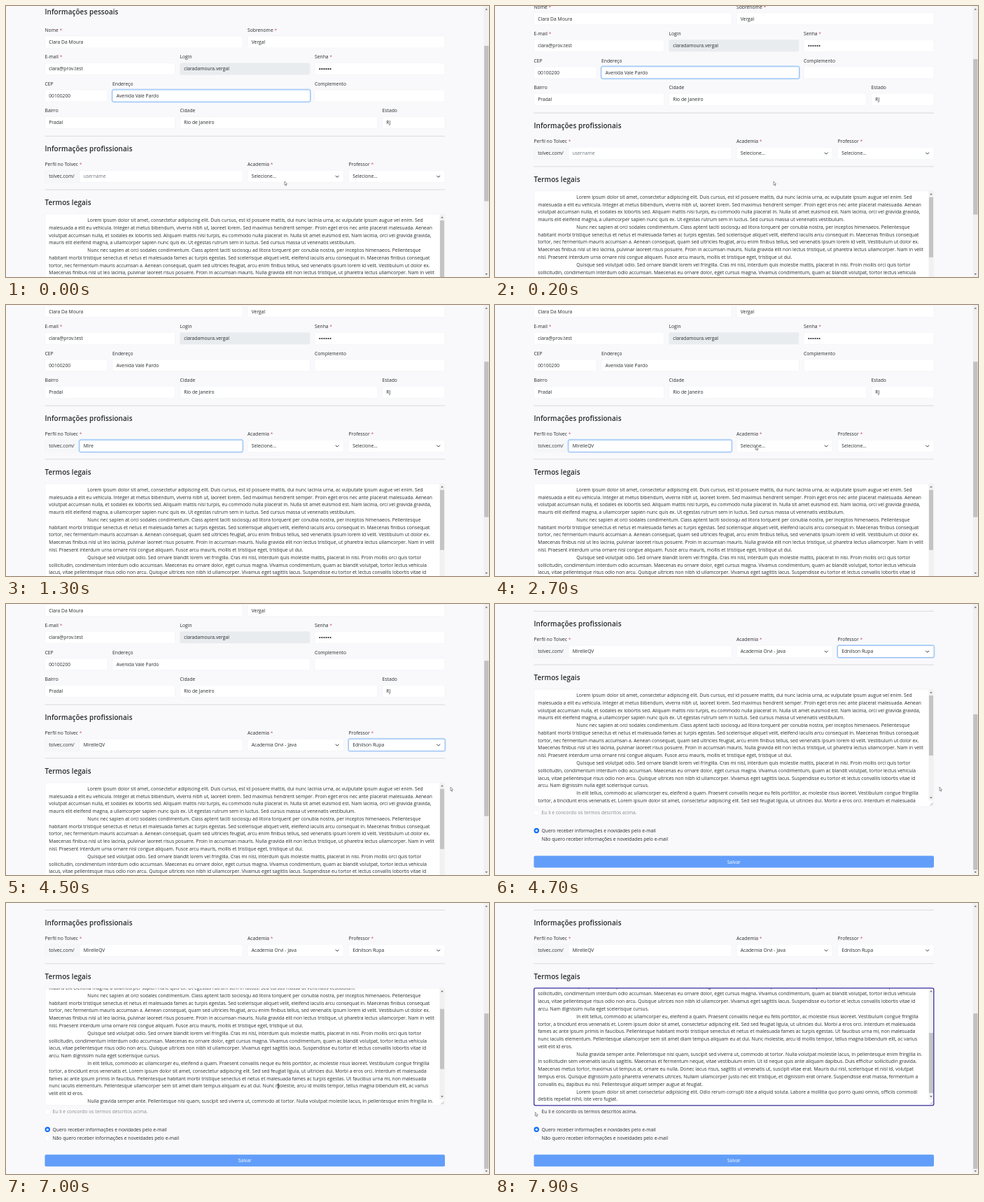
Write an HTML page with a canvas that moves like this. It is 690 px wide and 388 px high and loops after 8 s.

```html
<!DOCTYPE html>
<html lang="pt-BR">
<head>
<meta charset="utf-8">
<title>Cadastro</title>
<style>
html, body { margin: 0; width: 100%; height: 100%; overflow: hidden; background: #f9f9fc; }
canvas { display: block; }
</style>
</head>
<body>
<canvas id="stage" width="690" height="388"></canvas>
<script>
const ctx = document.getElementById('stage').getContext('2d');
const LOOP = 8000, STEP = 100;
const INK = '#262a2d', MUTED = '#6c757d', SIZE = 6.765, LINE = 10.785;

const TERMS = `\tLorem ipsum dolor sit amet, consectetur adipiscing elit. Duis cursus, est id posuere mattis, dui nunc lacinia urna, ac vulputate ipsum augue vel enim. Sed
malesuada a elit eu vehicula. Integer at metus bibendum, viverra nibh ut, laoreet lorem. Sed maximus hendrerit semper. Proin eget eros nec ante placerat malesuada. Aenean
volutpat accumsan nulla, et sodales ex lobortis sed. Aliquam mattis nisi turpis, eu commodo nulla placerat in. Nulla sit amet euismod est. Nam lacinia, orci vel gravida gravida,
mauris elit eleifend magna, a ullamcorper sapien nunc quis ex. Ut egestas rutrum sem in luctus. Sed cursus massa ut venenatis vestibulum.
\tNunc nec sapien at orci sodales condimentum. Class aptent taciti sociosqu ad litora torquent per conubia nostra, per inceptos himenaeos. Pellentesque
habitant morbi tristique senectus et netus et malesuada fames ac turpis egestas. Sed scelerisque aliquet velit, eleifend iaculis arcu consequat in. Maecenas finibus consequat
tortor, nec fermentum mauris accumsan a. Aenean consequat, quam sed ultricies feugiat, arcu enim finibus tellus, sed venenatis ipsum lorem id velit. Vestibulum ut dolor ex.
Maecenas finibus nisl ut leo lacinia, pulvinar laoreet risus posuere. Proin in accumsan mauris. Nulla gravida elit non lectus tristique, ut pharetra lectus ullamcorper. Nam in velit
nisl. Praesent interdum urna ornare nisi congue aliquam. Fusce arcu mauris, mollis et tristique eget, tristique ut dui.
\tQuisque sed volutpat odio. Sed ornare blandit lorem vel fringilla. Cras mi nisl, interdum quis molestie mattis, placerat in nisi. Proin mollis orci quis tortor
sollicitudin, condimentum interdum odio accumsan. Maecenas eu ornare dolor, eget cursus magna. Vivamus condimentum, quam ac blandit volutpat, tortor lectus vehicula
lacus, vitae pellentesque risus odio non arcu. Quisque ultrices non nibh id ullamcorper. Vivamus eget sagittis lacus. Suspendisse eu tortor et lectus convallis lobortis vitae id
arcu. Nam dignissim nulla eget scelerisque cursus.
\tIn elit tellus, commodo ac ullamcorper eu, eleifend a quam. Praesent convallis neque eu felis porttitor, ac molestie risus laoreet. Vestibulum congue fringilla
tortor, a tincidunt eros venenatis et. Lorem ipsum dolor sit amet, consectetur adipiscing elit. Sed sed feugiat ligula, ut ultricies dui. Morbi a eros orci. Interdum et malesuada
fames ac ante ipsum primis in faucibus. Pellentesque habitant morbi tristique senectus et netus et malesuada fames ac turpis egestas. Ut faucibus urna mi, non malesuada
nunc iaculis elementum. Pellentesque ullamcorper sem sit amet diam tempus aliquam eu at dui. Nunc molestie, arcu id mollis tempor, tellus magna bibendum elit, ac varius
velit elit id eros.
\tNulla gravida semper ante. Pellentesque nisi quam, suscipit sed viverra ut, commodo at tortor. Nulla volutpat molestie lacus, in pellentesque enim fringilla in.
In sollicitudin sem venenatis iaculis sagittis. Maecenas et fermentum neque, vitae vestibulum enim. Ut id neque quis ante aliquam dapibus. Duis efficitur sollicitudin gravida.
Maecenas metus tortor, maximus ut tempus at, ornare eu nulla. Donec lacus risus, sagittis ut venenatis ut, suscipit vitae erat. Mauris dui nisl, scelerisque et nisl id, volutpat
tempus eros. Quisque dignissim justo pharetra venenatis ultrices. Nullam ullamcorper justo nec elit tristique, et dignissim erat ornare. Suspendisse erat massa, fermentum a
convallis eu, dapibus eu nisl. Pellentesque aliquet semper augue at feugiat.
\tLorem ipsum dolor sit amet consectetur adipisicing elit. Odio rerum corrupti iste a aliquid soluta. Labore a mollitia quo porro quasi omnis, officiis commodi
debitis repellat nihil, iste vero fugiat.`.split('\n');

// Keyframes: [time, ...values]
const PAGE_SCROLL = [[0, 0], [100, 20.6], [200, 33.2], [300, 39.6], [400, 41.8], [500, 42.2],
  [4500, 42.2], [4600, 125], [4700, 176], [5000, 176.2]];
const TERMS_SCROLL = [[6800, 0], [6900, 14], [7000, 41], [7100, 52], [7200, 80], [7300, 100], [7400, 108.2]];
const POINTER = [[0, 398, 251], [500, 398, 251], [800, 250, 200], [2600, 372.5, 202], [2900, 372.5, 202],
  [3100, 384, 231], [3400, 384, 231], [3700, 512, 201], [3900, 512, 201], [4200, 530, 245], [4400, 530, 245],
  [4500, 635, 262], [5300, 635, 262], [5800, 100, 325], [6000, 100, 325], [6100, 79, 311], [6200, 79, 311],
  [6400, 59, 297], [6500, 59, 297], [6600, 266, 236], [6800, 266, 236], [6900, 389, 262], [7500, 389, 262],
  [7700, 165, 288], [7900, 57.5, 299.5]];
const FOCUS = [[0, 'address'], [800, 'user'], [2900, 'academy'], [3600, 'teacher'], [5700, ''], [7500, 'terms']];

function track(keys, t) {
  const next = keys.findIndex(k => k[0] > t);
  if (next === 0) return keys[0].slice(1);
  if (next < 0) return keys[keys.length - 1].slice(1);
  const a = keys[next - 1], b = keys[next], u = (t - a[0]) / (b[0] - a[0]);
  return a.slice(1).map((v, i) => v + (b[i + 1] - v) * u);
}

// Drawn at ten times the size and scaled down, for fractional glyph advances.
function text(str, x, cy, { color = INK, size = SIZE, weight = 400, align = 'left' } = {}) {
  ctx.save();
  ctx.translate(x, cy + size * 0.36);
  ctx.scale(0.1, 0.1);
  ctx.font = `${weight} ${size * 10}px "Open Sans", "Noto Sans", sans-serif`;
  ctx.textAlign = align;
  ctx.fillStyle = color;
  ctx.fillText(str, 0, 0);
  const width = ctx.measureText(str).width / 10;
  ctx.restore();
  return width;
}

function box(x, y, w, h, fill, stroke, line = 0.5, radius = 2) {
  ctx.beginPath();
  ctx.roundRect(x, y, w, h, radius);
  if (fill) { ctx.fillStyle = fill; ctx.fill(); }
  if (stroke) { ctx.strokeStyle = stroke; ctx.lineWidth = line; ctx.stroke(); }
}

function poly(points, fill, stroke, line = 0.7) {
  ctx.beginPath();
  points.forEach(([x, y]) => ctx.lineTo(x, y));
  if (fill) { ctx.closePath(); ctx.fillStyle = fill; ctx.fill(); }
  if (stroke) { ctx.strokeStyle = stroke; ctx.lineWidth = line; ctx.stroke(); }
}

function disc(x, y, r, fill, stroke) {
  ctx.beginPath();
  ctx.arc(x, y, r, 0, 7);
  ctx.fillStyle = fill;
  ctx.fill();
  if (stroke) { ctx.strokeStyle = stroke; ctx.lineWidth = 0.5; ctx.stroke(); }
}

const heading = (str, cy) => text(str, 55.5, cy, { size: 10.05, weight: 600 });

function rule(y) {
  ctx.fillStyle = '#d9dadd';
  ctx.fillRect(55.5, y - 0.5, 571.5, 1);
}

function label(str, x, cy, required) {
  const width = text(str, x, cy);
  if (required) text('*', x + width + 1.8, cy, { color: '#d4616b' });
}

function field(x, right, cy, value, { focused, fill = '#fff', color = INK } = {}) {
  const w = right - x;
  if (focused) box(x - 0.5, cy - 9, w + 1, 18, null, '#c3dcf8', 2, 3);
  box(x, cy - 8.5, w, 17, fill, focused ? '#93c0f6' : '#eceef1', focused ? 0.9 : 0.5);
  text(value, x + 5.7, cy, { color });
}

function select(x, right, cy, value, focused) {
  field(x, right, cy, value, { focused });
  const c = right - 9.3;
  poly([[c - 2.4, cy - 1.1], [c, cy + 1.3], [c + 2.4, cy - 1.1]], null, '#343a40', 1);
}

function arrowHead(x, y, dir) {
  poly([[x - 1.8, y + dir], [x + 1.8, y + dir], [x, y - dir]], '#666');
}

function termsArea(scroll, focused) {
  const top = 298, h = 168;
  box(55.8, top, 571, h, '#fff', '#e9ebee');
  ctx.save();
  ctx.beginPath();
  ctx.rect(56, top + 0.5, 563, h - 1);
  ctx.clip();
  TERMS.forEach((row, i) => {
    const indent = row[0] === '\t';
    text(row.trim(), indent ? 116.3 : 61.3, 306.5 + i * LINE - scroll);
  });
  ctx.restore();
  ctx.fillStyle = '#f1f1f1';
  ctx.fillRect(619.5, top + 0.5, 7, 159);
  ctx.fillStyle = '#c4c4c4';
  ctx.fillRect(620, 307 + scroll * 0.51, 6, 86);
  arrowHead(623, 302.5, 1);
  arrowHead(623, 453.5, -1);
  poly([[621.5, 464.5], [625.5, 460.5]], null, '#888');
  poly([[623.8, 464.5], [625.5, 462.8]], null, '#888');
  if (focused) box(55.8, top, 571, h, null, '#3a2f9b', 1.3);
}

function form(t, focus) {
  const [scroll] = track(TERMS_SCROLL, t);
  const accepted = t >= 7400;

  heading('Informações pessoais', 8.5);
  label('Nome', 55.5, 34.5, true);
  field(55.5, 338, 51.5, 'Clara Da Moura');
  label('Sobrenome', 345, 34.5, true);
  field(345, 627, 51.5, 'Vergal');

  label('E-mail', 55.5, 73, true);
  field(55.5, 241.5, 90, 'clara@prov.test');
  label('Login', 248.5, 73);
  field(248.5, 434, 90, 'claradamoura.vergal', { fill: '#e9ecef' });
  label('Senha', 441, 73, true);
  field(441, 627, 90, '');
  for (let i = 0; i < 6; i++) disc(448.3 + i * 3.05, 90.2, 1.1, INK);

  label('CEP', 55.5, 111.5);
  field(55.5, 145, 128.5, '00100200');
  label('Endereço', 152, 111.5);
  field(152, 434.5, 128.5, 'Avenida Vale Pardo', { focused: focus === 'address' });
  label('Complemento', 441, 111.5);
  field(441, 627, 128.5, '');

  label('Bairro', 55.5, 150);
  field(55.5, 241.5, 167, 'Pradal');
  label('Cidade', 248.5, 150);
  field(248.5, 530.5, 167, 'Rio de Janeiro');
  label('Estado', 537.5, 150);
  field(537.5, 627, 167, 'RJ');

  rule(186.3);
  heading('Informações profissionais', 204.3);
  label('Perfil no Tolvec', 55.5, 227, true);
  field(55.5, 105, 244, 'tolvec.com/', { fill: '#f6f7f9' });
  let typed = Math.max(0, Math.min(7, Math.floor((t - 900) / 100)));
  if (t >= 1900) typed = t >= 2200 ? 9 : 8;
  field(105, 338, 244, 'MirelleQV'.slice(0, typed) || 'username',
    { focused: focus === 'user', color: typed ? INK : MUTED });
  label('Academia', 345, 227, true);
  select(345, 482.5, 244, t < 3200 ? 'Selecione...' : 'Academia Orvi - Java', focus === 'academy');
  label('Professor', 489.5, 227, true);
  select(489.5, 627, 244, t < 4000 ? 'Selecione...' : 'Ednilson Rupa', focus === 'teacher');

  rule(263);
  heading('Termos legais', 281.3);
  termsArea(scroll, focus === 'terms');

  box(55.8, 471.5, 7, 7, '#fff', '#eceef1', 0.5, 1.5);
  text('Eu li e concordo os termos descritos acima.', 66.5, 475, { color: accepted ? INK : '#85898d' });
  disc(59.3, 500.5, 3.7, '#0d6efd');
  disc(59.3, 500.5, 1.6, '#fff');
  text('Quero receber informações e novidades pelo e-mail', 66.5, 500.7);
  disc(59.3, 512.8, 3.5, '#fff', '#eceef1');
  text('Não quero receber informações e noveidades pelo e-mail', 66.5, 512.8);
  box(55.5, 536.5, 571.5, 17, '#629ef9');
  text('Salvar', 341.2, 545.2, { color: '#fff', align: 'center' });
}

function pageScrollbar(scroll) {
  ctx.fillStyle = '#f1f1f1';
  ctx.fillRect(682.5, 0, 7.5, 388);
  ctx.fillStyle = '#c1c1c1';
  ctx.fillRect(683.2, 57 + scroll * 0.574, 6.3, 222.5);
  arrowHead(686.3, 4.5, 1);
  arrowHead(686.3, 384, -1);
}

function pointer(t) {
  if (t >= 1000 && t < 2700) return;
  const [x, y] = track(POINTER, t);
  ctx.save();
  ctx.translate(x, y);
  if (t >= 6600 && t < 7700) {
    poly([[0, -3], [0, 3]], null, '#222', 0.9);
    for (const end of [-3, 3]) poly([[-1.3, end], [1.3, end]], null, '#222');
  } else {
    poly([[0, 0], [0, 5.4], [1.2, 4.4], [2, 6.3], [2.8, 5.9], [2, 4.1], [3.6, 4], [0, 0]], '#fff', '#555', 0.6);
  }
  ctx.restore();
}

function draw(now) {
  const t = Math.floor((now % LOOP) / STEP) * STEP;
  const [scroll] = track(PAGE_SCROLL, t);
  const focus = FOCUS.filter(f => f[0] <= t).pop()[1];
  ctx.fillStyle = '#f9f9fc';
  ctx.fillRect(0, 0, 690, 388);
  ctx.save();
  ctx.translate(0, -scroll);
  form(t, focus);
  ctx.restore();
  pageScrollbar(scroll);
  pointer(t);
}

const start = performance.now();
function frame() {
  draw(performance.now() - start);
  requestAnimationFrame(frame);
}
frame();
</script>
</body>
</html>
```
